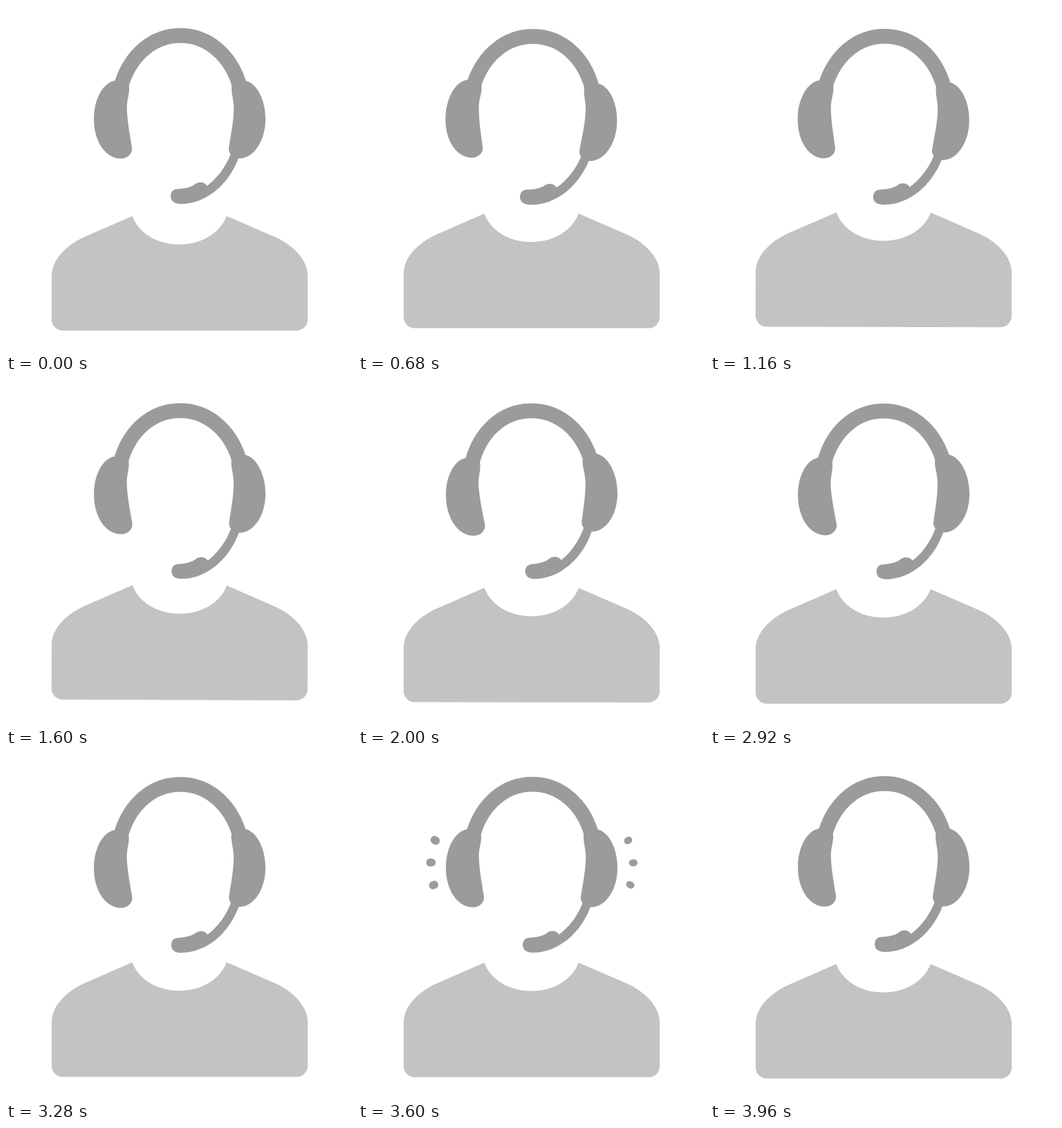
An HTML page for the animation above (4000 ms loop, 500x500 px).

```html
<!DOCTYPE html>
<html lang="en">
<head>
<meta charset="utf-8">
<title>Headset agent</title>
<style>
  html, body { margin: 0; width: 100%; height: 100%; overflow: hidden; background: #fff; }
  svg { display: block; width: 100%; height: 100%; }

  .body {
    fill: #c3c3c3;
    transform-origin: 251px 385px;
    animation: body-bob 4s linear infinite, body-tilt 4s ease-in-out infinite;
  }
  .head {
    fill: #9b9b9b;
    stroke: #9b9b9b;
    stroke-width: 0;
    transform-origin: 251px 163px;
    animation: head-bob 4s linear infinite, head-tilt 4s cubic-bezier(.37, 0, .63, 1) infinite;
  }
  .band { fill: none; stroke-width: 21.5; }
  .rays {
    fill: none;
    stroke-linecap: round;
    stroke-dasharray: 1 3;
    animation: ray-grow 4s linear infinite, ray-show 4s step-end infinite;
  }
  .left { stroke-width: 11.5; }
  .right { stroke-width: 10; }

  @keyframes body-bob {
    0%, 100% { translate: 0 0; }
    8% { translate: 0 -1.2px; }
    17% { translate: 0 -3.4px; }
    29% { translate: 0 -5.2px; }
    38% { translate: 0 -6.9px; }
    41% { translate: 0 -6.6px; }
    50% { translate: 0 -3.2px; }
    56% { translate: 0 -.8px; }
    59% { translate: 0 -.2px; }
    64% { translate: 0 -.1px; }
    73% { translate: 0 -1.2px; }
    82% { translate: 0 -2.4px; }
    90% { translate: 0 -1.9px; }
    97% { translate: 0 -.2px; }
  }
  @keyframes body-tilt {
    0%, 14%, 57%, 100% { rotate: 0deg; }
    40% { rotate: .22deg; }
  }
  @keyframes head-bob {
    0%, 99%, 100% { translate: 0 0; }
    17% { translate: -.6px 1.2px; }
    34% { translate: -.2px .9px; }
    40% { translate: 0 1.4px; }
    59% { translate: 0 1.9px; }
    73% { translate: 0 2px; }
    82% { translate: 0 1.3px; }
    90% { translate: 0 1px; }
  }
  @keyframes head-tilt {
    0%, 93%, 100% { rotate: 0deg; }
    17.5% { rotate: 1.7deg; }
    57.5% { rotate: -2.2deg; }
  }
  @keyframes ray-grow {
    0%, 54%, 67%, 89%, 98%, 100% { stroke-dashoffset: .95; }
    57%, 64%, 92%, 95% { stroke-dashoffset: 0; }
    90% { stroke-dashoffset: .75; }
  }
  @keyframes ray-show {
    0%, 67%, 98%, 100% { opacity: 0; }
    54%, 89% { opacity: 1; }
  }
</style>
</head>
<body>
<svg viewBox="0 0 500 500">
  <path class="body" d="M182.5 303.5C191 327 217 344.5 250.5 344.5S310 327 318.8 303.5L387 333C415 345 436 367 436 390V453A16 16 0 0 1 420 469H82A16 16 0 0 1 66 453V390C66 367 87 345 115 333Z"/>
  <g class="head">
    <path class="band" d="M167 113C180 71 212 42.8 252 42.8S324 71 337 113"/>
    <path d="M157 108C140 111 127 135 127 163.5C127 196 144 220.5 166 220.5C176 220.5 183 213 182 205C179 186 175 165 174.7 147C174.7 135 178.5 127 178 118C178 112 172 110 172 110Z"/>
    <path d="M346 108C362 111 375 135 375 163.5C375 196 357 220.3 337.5 220.3C327.5 220.3 320.8 213 322 205C325 186 329.3 165 329.2 147C329 135 325.7 127 326 118C326 112 332 110 332 110Z"/>
    <path d="M325.5 212C317.5 233.5 304.5 249.5 290.5 260C287.5 255 280 253 274 257C268 262 258 264 247 264.5C241 265 238 269.5 238 274.5C238 282 243 286 253 286C288 286 322 259 336.7 218Z"/>
    <g class="rays left">
      <path pathLength="1" d="M112.5 124.3L105 119.8"/>
      <path pathLength="1" d="M106.5 155.8H97.7"/>
      <path pathLength="1" d="M110.3 187.8L102.5 191.6"/>
    </g>
    <g class="rays right">
      <path pathLength="1" d="M389.5 124.5L396.5 120"/>
      <path pathLength="1" d="M396.5 156.4L406 156.2"/>
      <path pathLength="1" d="M392.5 187.5L400 192"/>
    </g>
  </g>
</svg>
</body>
</html>
```
